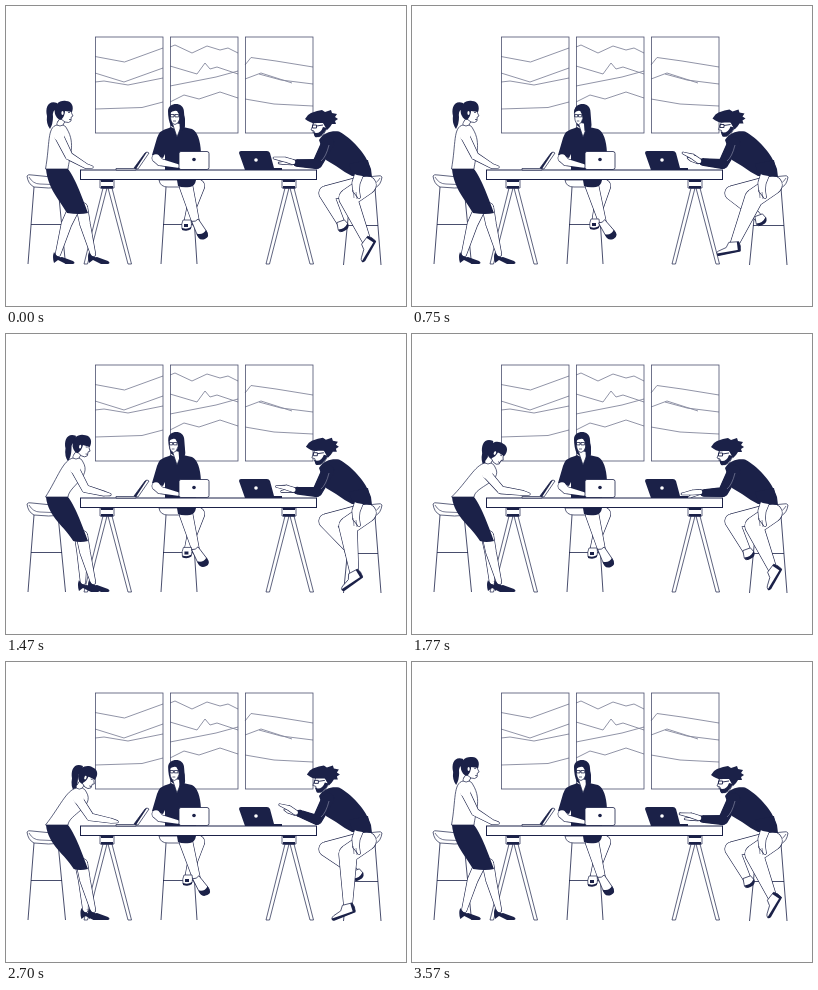
An HTML page that plays this animation: 400 px wide and 300 px high, repeating every 3600 ms.

```html
<!DOCTYPE html>
<html lang="en">
<head>
<meta charset="utf-8">
<title>Team at a table</title>
<style>
html, body { margin: 0; width: 100%; height: 100%; overflow: hidden; background: #fff; }
svg { display: block; width: 100vw; height: 100vh; }
</style>
</head>
<body>
<svg id="stage" viewBox="0 0 400 300"></svg>
<script>
const INK = '#1b2148', PERIOD = 3600;
const TIMES = [0, 750, 1230, 1770, 2250, 3120];
const stage = document.getElementById('stage');

function add(tag, attrs, parent = stage) {
  const el = document.createElementNS('http://www.w3.org/2000/svg', tag);
  for (const k in attrs) el.setAttribute(k, attrs[k]);
  parent.appendChild(el);
  return el;
}
const group = parent => add('g', {}, parent);
const line = (d, parent, w = 0.8, stroke = INK) =>
  add('path', { d, fill: 'none', stroke, 'stroke-width': w, 'stroke-linejoin': 'round' }, parent);
const white = (d, parent) =>
  add('path', { d, fill: '#fff', stroke: INK, 'stroke-width': 0.7, 'stroke-linejoin': 'round' }, parent);
const dark = (d, parent) => add('path', { d, fill: INK }, parent);

// Smooth periodic interpolation through one value per key time.
function track(...v) {
  const n = TIMES.length;
  const span = i => (i === n - 1 ? PERIOD : TIMES[i + 1]) - TIMES[i];
  const rise = v.map((a, i) => (v[(i + 1) % n] - a) / span(i));
  const slope = rise.map((b, i) => {
    const a = rise[(i + n - 1) % n];
    return a * b <= 0 ? 0 : 2 * a * b / (a + b);
  });
  return t => {
    let i = n - 1;
    while (TIMES[i] > t) i--;
    const j = (i + 1) % n, h = span(i), u = (t - TIMES[i]) / h;
    const u2 = u * u, u3 = u2 * u;
    return v[i] * (2 * u3 - 3 * u2 + 1) + v[j] * (3 * u2 - 2 * u3)
      + h * (slope[i] * (u3 - 2 * u2 + u) + slope[j] * (u3 - u2));
  };
}
const point = (xs, ys) => {
  const x = track(...xs), y = track(...ys);
  return t => [x(t), y(t)];
};

// A chain of tapered capsules, outlined as a single shape.
function limbPath(pts, radii) {
  let d = '';
  pts.forEach(([x, y], i) => {
    const r = radii[i];
    d += `M${x - r},${y}a${r},${r} 0 1 0 ${2 * r},0a${r},${r} 0 1 0 ${-2 * r},0Z`;
    if (!i) return;
    const [px, py] = pts[i - 1], q = radii[i - 1];
    const len = Math.hypot(x - px, y - py) || 1;
    const nx = (py - y) / len, ny = (x - px) / len;
    d += `M${px + nx * q},${py + ny * q}L${x + nx * r},${y + ny * r}`
      + `L${x - nx * r},${y - ny * r}L${px - nx * q},${py - ny * q}Z`;
  });
  return d;
}
function limb(radii, parent, fill = '#fff') {
  const edge = add('path', { fill: INK, stroke: INK, 'stroke-width': 1.2 }, parent);
  const body = add('path', { fill }, parent);
  return (...pts) => {
    const d = limbPath(pts, radii);
    edge.setAttribute('d', d);
    body.setAttribute('d', d);
  };
}
function place(el, [x, y], angle = 0) {
  el.setAttribute('transform', `translate(${x} ${y}) rotate(${angle})`);
}

// Wall panels
const RIDGES = [
  'M89,50.5L118.5,56L157,42M89,67L118,76L157,62M89,76L98,75L122,79L157,72M89,103L136,101.5L157,96',
  'M164,41L169,39L186,47L201,40L214,44L222,42L232,47M164,60L191,68L199,57L204,63L211,61L232,68M164,80L210,71L232,65M164,96L178,89L193,93L214,86L232,92',
  'M239,59L245,51.5L270,55L307,61M239,73L255,67L286,77M253,68L275,74L307,78M239,93L268,98L307,100'
];
RIDGES.forEach((d, i) => {
  line(d, stage, 0.9, '#85889e');
  add('rect', { x: 89.5 + 75 * i, y: 31, width: 67.5, height: 96, fill: 'none', stroke: '#4d516f', 'stroke-width': 0.8 });
});

// Stools
function stool(transform) {
  const g = add('g', { transform });
  line('M28,181L22,258M52,181L59.5,258M25,218.5H56', g);
  white('M21,170Q22,168 26,169L46,171Q55,174 58,181Q42,183 28,181Q22,178 21,170Z', g);
  line('M23,171Q27,178 34,178L57,179', g, 0.6);
}
stool('');
stool('translate(397 1) scale(-1 1)');
line('M160,181L155,258M186,181L191,258M157,218.5H188');
white('M153,174Q154,181 162,181H188V174Z');

// Standing woman
const wA = group();
const legBack = limb([5.5, 5, 2.4], wA), legFront = limb([5.5, 5, 2.4], wA);
const PUMP = 'M-4,-2Q-1,4 4,3L15,7Q18,9 15,10H8L0,6L-4,9Q-6,3 -4,-2Z';
const pumpBack = dark(PUMP, wA), pumpFront = dark(PUMP, wA);
const skirt = dark('', wA);
const tailA = dark('M1,-3C-8,-6 -11,2 -9,10Q-10,18 -6,23Q-3,18 -3,11Q-4,4 1,3Z', wA);
const neckA = limb([2.8, 2.6], wA);
const shirtA = white('', wA);
const armA = limb([4.2, 3.6, 2.2, 1], wA);
const shoulderA = add('circle', { r: 5.6, fill: '#fff' }, wA);
const headA = group(wA);
white('M0,-12L11,-15L11.5,-11L13,-8L11.2,-7L11,-3Q9,-.5 5,-2L1,-5Z', headA);
dark('M-5,-10C-7,-20 0,-24 6,-23C12,-23 14,-17 12,-12L5,-13Q5,-8 1,-4C-3,-5 -4,-8 -5,-10Z', headA);
add('ellipse', { cx: 2.5, cy: -11, rx: 1.1, ry: 1.9, fill: '#fff' }, headA);
line('M8,-11.5h2M9,-4.5h2', headA, 0.7);

const A = {
  neck: point([54, 54, 63, 76, 76, 68], [118, 118, 119, 128, 128, 121]),
  tilt: track(0, 0, -3, 25, 25, 11),
  elbow: point([63, 63, 70, 89, 89, 76], [150, 150, 153, 156, 156, 153]),
  hand: point([86, 86, 92, 117, 116, 103], [161, 161, 161, 160, 160, 159.5]),
  foot: track(52, 52, 72, 80, 80, 78),
  hem: track(61, 61, 66, 68, 68, 67)
};
function drawA(t) {
  const [x, y] = A.neck(t), tilt = A.tilt(t), hem = A.hem(t), foot = A.foot(t);
  const [ex, ey] = A.elbow(t), [hx, hy] = A.hand(t);
  legBack([hem + 7, 202], [(hem + foot) / 2 + 4, 218], [foot, 248]);
  legFront([76, 202], [79, 218], [87, 248]);
  place(pumpBack, [foot, 248]);
  place(pumpFront, [87, 248]);
  skirt.setAttribute('d', `M40,163H62C68,170 76,190 82,207Q74,209 ${hem},207C${hem - 8},193 42,183 40,163Z`);
  shirtA.setAttribute('d', `M${x - 3},${y + 1}C${x - 13},${y + 3} ${(x + 34) / 2},${y + 20} 39.5,163H62`
    + `C63,152 ${x + 16},${y + 20} ${x + 7},${y + 5}Q${x + 6},${y + 2} ${x + 3},${y + 1}Q${x},${y + 3} ${x - 3},${y + 1}Z`);
  armA([x - 1, y + 12], [ex, ey], [hx - 6, hy - 1], [hx, hy]);
  place(shoulderA, [x - 1, y + 11]);
  neckA([x, y], [x + 3, y - 5]);
  const a = tilt * Math.PI / 180, c = Math.cos(a), s = Math.sin(a);
  place(tailA, [x - 4 * c + 18 * s, y - 4 * s - 18 * c], tilt * 0.2);
  place(headA, [x, y], tilt);
}

// Seated woman
const wB = group();
const legL = limb([6.5, 3], wB), legR = limb([6.5, 3.4], wB);
const shoeL = group(wB);
white('M-4,-3L4,-3Q5,1 4,5Q0,8 -5,6Q-6,1 -4,-3Z', shoeL);
dark('M-3,1h4v3h-4ZM-5,5Q0,7 4,4V6Q0,9 -5,7Z', shoeL);
const shoeR = group(wB);
white('M-3.5,-3Q0,-1 3.5,-3L7,11Q8,17 3,17Q-3,17 -3,10Z', shoeR);
dark('M-3,10Q2,14 7,10Q9,18 3,18Q-4,18 -3,10Z', shoeR);
dark('M171,174H190Q189,180 184,181Q176,182 172,180Z', wB);
dark('M163,122Q153,124 151,132L146,149L157,152L159,148V164H190V146L195,147Q194,127 186,123L177,121L171,124L165,121Z', wB);
limb([3.8, 3.4, 1.8], wB)([150, 152], [154, 156], [172, 160]);
const hairB = dark('M162,105C162,96 178,95 178,106L179,119Q179,124 174,125L165,120Q162,114 162,105Z', wB);
white('M166,116L171,131L176,118Z', wB);
const faceB = group(wB);
white('M-4.5,-5Q0,-8 5,-5V3Q3,9 0,9Q-4,8 -4.5,2Z', faceB);
dark('M-5.5,-2Q-5,-11 3,-9Q7,-6 6,4Q4,-2 2,-4.5Q-2,-5.5 -5.5,-2Z', faceB);
line('M-4.5,-1h3.5v2.4h-3.5ZM0,-1h3.7v2.4h-3.7ZM-1,-.4h1', faceB, 0.8);
line('M-2,5.5h3', faceB, 0.7);
const sideHair = dark('M173,104Q180,107 179,118Q179,124 174,125Q173,112 173,104Z', wB);

const B = {
  turn: track(0, 1, 1, 0, 0, 0.5),
  left: point([181, 183, 182, 181, 182, 182], [217, 216, 216, 217, 216, 216]),
  right: point([190, 191, 190, 190, 191, 191], [217, 218, 217, 217, 218, 218]),
  swing: track(-20, -27, -26, -20, -25, -24)
};
function drawB(t) {
  const turn = B.turn(t), l = B.left(t), r = B.right(t);
  legL([192, 180], l);
  legR([180, 180], r);
  place(shoeL, l);
  place(shoeR, r, B.swing(t));
  faceB.setAttribute('transform', `translate(${169 - 2.5 * turn} 109.5) scale(${1 - 0.15 * turn} 1)`);
  sideHair.setAttribute('transform', `translate(${-1.5 * turn} 0)`);
  hairB.setAttribute('transform', `translate(${turn / 2} 0)`);
}

// Seated man
const mC = group();
const legFar = limb([9, 7, 3.4], mC);
const shoeFar = group(mC);
white('M-4,-4L4,-4L6,1Q4,5 -2,6Q-6,6 -5,2Z', shoeFar);
dark('M-5,3Q1,5 6,0Q7,4 3,6Q-5,8 -5,3Z', shoeFar);
const legNear = limb([9, 9, 4], mC);
const sneaker = group(mC);
white('M-5,-3L5,-3Q7,1 6,6L-17,9Q-20,7 -16,5L-8,2Z', sneaker);
dark('M-19,7.5L6,5V7L-16,10Q-19,10 -19,7.5Z', sneaker);
dark('M3,-3H5Q7,1 6,6H3.5Z', sneaker);
dark('M313,134C318,126 326,124.5 333,125.5C345,132 360,147 365,163L366,171L346,170Q338,166 330,160L320,154Z', mC);
limb([4.2, 3.8, 3.2, 1.2], mC)([354, 166], [350, 177], [350, 184], [353, 191]);
dark('M343,158L362,154L365,169Q355,172 346,167Z', mC);
line('M347,184l1,8M350,186l1,7', mC, 0.5);
const sleeve = limb([6, 4.5, 3.2], mC, INK);
const finger = limb([1.6, 1.2, 0.6], mC), palm = limb([2.3, 2.2, 0.7], mC);
line('M323,139Q320,151 315,155', mC, 0.5, '#a9abc0');
const headC = group(mC);
white('M309,113L307,119L305,124L308,125L309,130Q313,132 317,129L323,119Z', headC);
dark('M307,126L309,131Q315,133 321,122L317,121Q315,127 310,127Z', headC);
dark('M299,113L302,109L305,107L311,105L316,104L319,106L325,104L326,107L331,108L329,111L332,113L329,115L330,118L326,118L324,121L321,124L317,117L311,117Q305,118 299,113Z', headC);
line('M306.5,119h4v3h-4ZM310.5,120L317,119', headC, 0.9);

const C = {
  ankle: point([361, 322, 335, 361, 342, 342], [236, 239, 243, 236, 245, 245]),
  roll: track(-53, -4, -8, -53, -14, -14),
  far: point([336, 348, 349, 336, 351, 351], [219, 213, 214, 219, 212, 212]),
  wrist: point([288, 288, 288, 289, 290, 291], [156, 155, 154, 158, 152, 150]),
  tip: point([268, 271, 271, 270, 273, 274], [152, 147, 147, 160, 145, 142]),
  nod: track(0, 1.5, 1.5, 0, 1.5, 2)
};
function drawC(t) {
  const ankle = C.ankle(t), far = C.far(t), nod = C.nod(t);
  const [wx, wy] = C.wrist(t), [tx, ty] = C.tip(t);
  legFar([358, 179], [320, 187], far);
  place(shoeFar, far, -20);
  legNear([361, 179], [342, 192], ankle);
  place(sneaker, ankle, C.roll(t));
  sleeve([322, 137], [311, 158], [wx + 3, wy + 1]);
  const kx = (wx + tx) / 2, ky = (wy + ty) / 2;
  finger([wx - 2, wy + 1], [kx, ky + 3], [tx + 5, ty + 5]);
  palm([wx - 1, wy], [kx + 1, ky - 0.5], [tx, ty]);
  headC.setAttribute('transform', `translate(${nod} ${-nod / 3})`);
}

// Table and laptops
[94, 276].forEach(x => {
  const g = add('g', { transform: `translate(${x} 0)` });
  white('M3,182L-16,258H-12.5L7,182ZM8,182L28,258H31.5L12,182Z', g);
  white('M0,174h14v8h-14Z', g);
  dark('M1,173h12v3h-12ZM1,180h12v2.5h-12Z', g);
});
add('rect', { x: 74.5, y: 164, width: 236, height: 9.5, fill: '#fff', stroke: INK, 'stroke-width': 1 });
white('M110,162.5H130V164H110Z');
white('M128,162L139,147Q141,145 143,147L132,163Z');
dark('M128,162L139,147L141,146L130,163Z');
add('rect', { x: 173, y: 145.5, width: 30, height: 18, rx: 2, fill: '#fff', stroke: INK, 'stroke-width': 0.8 });
add('circle', { cx: 188, cy: 153.5, r: 1.8, fill: INK });
dark('M233,147Q233,145 235,145H261Q263,145 264,147L268,162H276V164H239Z');
add('circle', { cx: 250, cy: 154, r: 1.8, fill: '#fff' });

// Hands rest above the table edge
stage.appendChild(wA);

function frame(now) {
  const t = now % PERIOD;
  drawA(t);
  drawB(t);
  drawC(t);
  requestAnimationFrame(frame);
}
frame(0);
</script>
</body>
</html>
```
